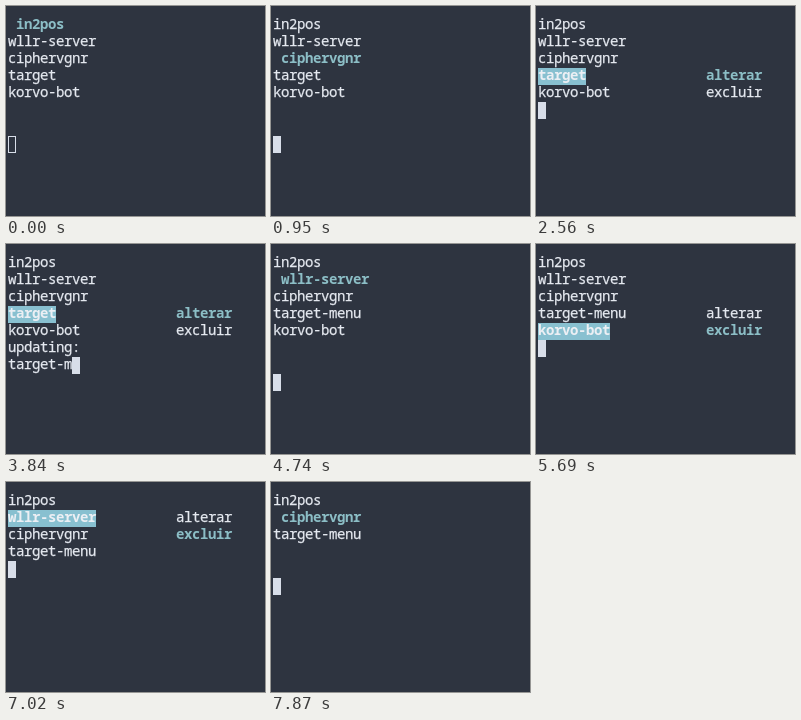
An HTML page that plays this animation: 259x210 px, repeating every 8000 ms.

```html
<!DOCTYPE html>
<html lang="pt">
<head>
<meta charset="utf-8">
<title>Terminal menu</title>
<style>
html, body { margin: 0; width: 100%; height: 100%; overflow: hidden; background: #2e3440; }
svg { display: block; }
text {
  font: 14px "Noto Sans Mono", "DejaVu Sans Mono", monospace;
  letter-spacing: -.4px;
  white-space: pre;
  fill: #e5e9f0;
  stroke: #e5e9f0;
  stroke-width: .25px;
}
.active, .chosen { font-weight: 700; stroke: none; }
.active { fill: #8cbec6; }
.chosen { fill: #eceff4; }
.bar { fill: #88c0d0; }
.cursor { fill: #d8dee9; }
.hollow { fill: none; stroke: #d8dee9; }
</style>
</head>
<body>
<svg id="screen" width="259" height="210" viewBox="0 0 259 210"></svg>
<script>
const LOOP = 8000, CELL = 8, LINE = 17, LEFT = 2, TOP = 11, SUB_COL = 21;
const screen = document.getElementById('screen');
const x = col => LEFT + col * CELL;
const y = row => TOP + row * LINE;

const text = (col, row, str, cls = '') =>
  `<text x="${x(col)}" y="${y(row) + 12}" class="${cls}">${str}</text>`;
const block = (col, row, cols, cls) =>
  `<rect x="${x(col)}" y="${y(row)}" width="${cols * CELL}" height="${LINE}" class="${cls}"/>`;
const hollowCursor = row =>
  `<rect x="${x(0) + .5}" y="${y(row) + .5}" width="${CELL - 1}" height="${LINE - 1}" class="hollow"/>`;

function menu({ items, sel, focused }) {
  const rows = items.map((s, i) => i === sel ? text(1, i, s, 'active') : text(0, i, s));
  const end = items.length + 2;
  return rows.join('') + (focused ? block(0, end, 1, 'cursor') : hollowCursor(end));
}

function submenu({ items, sel, option, typed }) {
  const first = Math.min(sel, items.length - 2);
  const end = items.length;
  const typing = typed !== undefined;
  return block(0, sel, items[sel].length, 'bar') +
    items.map((s, i) => text(0, i, s, i === sel ? 'chosen' : '')).join('') +
    ['alterar', 'excluir'].map((s, i) =>
      text(SUB_COL, first + i, s, i === option ? 'active' : '')).join('') +
    (typing ? text(0, end, 'updating:') + text(0, end + 1, typed) : '') +
    block(typing ? typed.length : 0, typing ? end + 1 : end, 1, 'cursor');
}

// Each action changes the state and records it with its start time.
const state = { items: ['in2pos', 'wllr-server', 'ciphervgnr', 'target', 'korvo-bot'], sel: 0 };
const timeline = [];
function at(time, change) {
  Object.assign(state, change);
  timeline.push({ time, ...state });
}
function press(time, gap, count, dir) {
  const n = state.items.length;
  for (let i = 0; i < count; i++) at(time + i * gap, { sel: (state.sel + dir + n) % n });
}
function type(time, gap, word) {
  for (let i = 1; i <= word.length; i++) at(time + i * gap, { typed: word.slice(0, i) });
}
const open = time => at(time, { option: 0 });
const nextOption = time => at(time, { option: 1 });
const back = (time, items) =>
  at(time, { items, sel: 0, option: undefined, typed: undefined });
const without = name => state.items.filter(s => s !== name);

at(0, { focused: false });
at(280, { focused: true });
press(450, 110, 3, 1);
press(950, 110, 5, -1);
press(1560, 170, 2, -1);
press(2170, 170, 2, 1);

open(2560);
at(3220, { typed: '' });
type(3320, 61, 'target-menu');
back(4240, state.items.map(s => s === 'target' ? state.typed : s));

press(4740, 167, 4, 1);
open(5410);
nextOption(5690);
back(6020, without('korvo-bot'));

press(6520, 0, 1, 1);
open(6800);
nextOption(7020);
back(7300, without('wllr-server'));
press(7520, 116, 4, 1);

let shown;
const start = performance.now();
function tick() {
  const t = (performance.now() - start) % LOOP;
  const step = timeline.findLast(s => s.time <= t);
  if (step !== shown) {
    shown = step;
    screen.innerHTML = step.option === undefined ? menu(step) : submenu(step);
  }
  requestAnimationFrame(tick);
}
tick();
</script>
</body>
</html>
```
